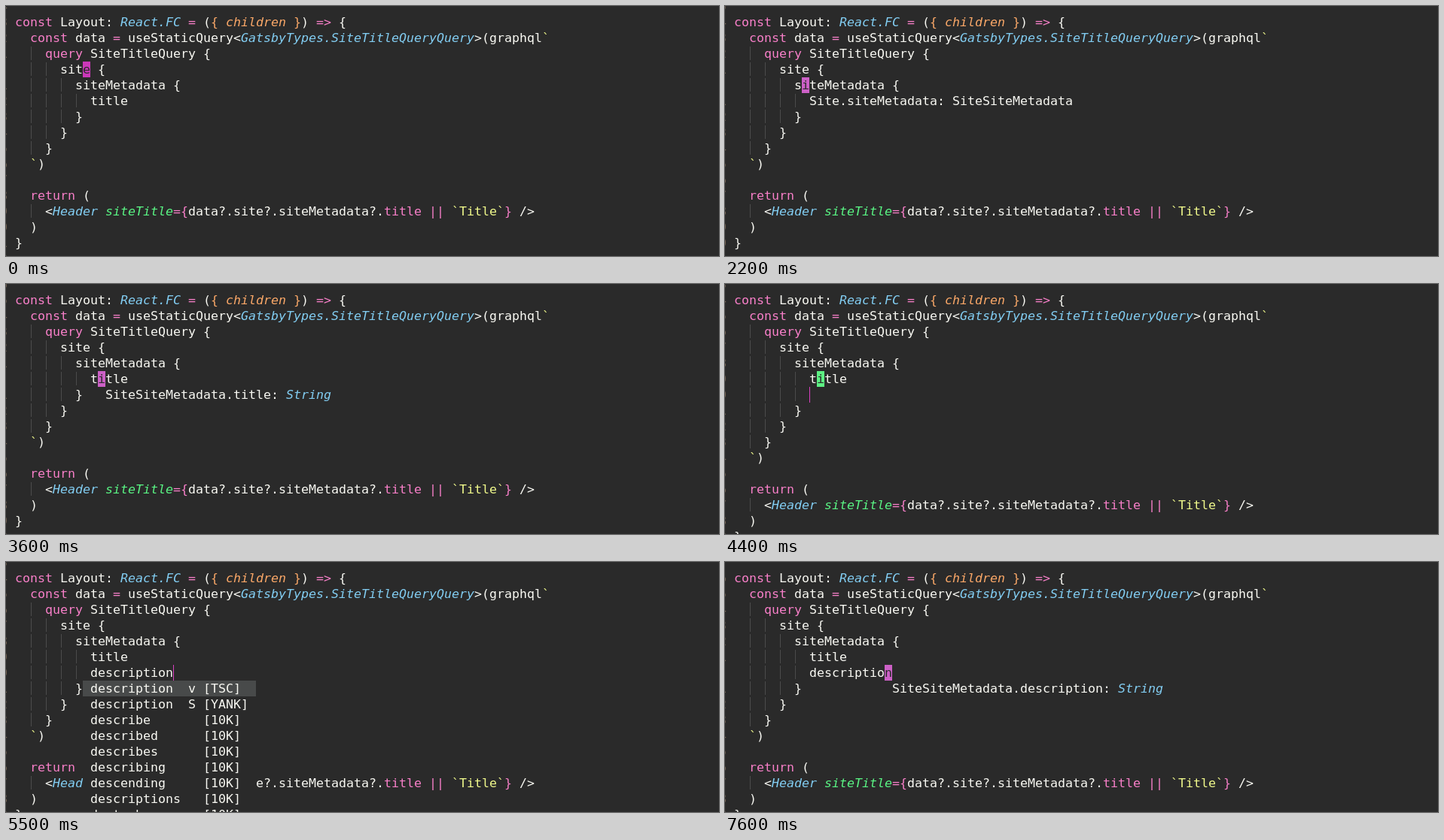
Animation of 947 by 333 pixels, one loop 8 s. Source, as an HTML page:

```html
<!DOCTYPE html>
<html lang="en">
<head>
<meta charset="utf-8">
<title>Editor</title>
<style>
  html, body { margin: 0; width: 100%; height: 100%; overflow: hidden; background: #2a2a2a; }
  #screen {
    position: relative; width: 947px; height: 333px; overflow: hidden;
    font: 16.61px/21px "DejaVu Sans Mono", monospace;
    font-variant-ligatures: none; color: #f8f8f2;
  }
  #screen div { position: absolute; height: 21px; white-space: pre; }
  .p { color: #f77fc8; }
  .c { color: #82cdf2; font-style: italic; }
  .o { color: #fba868; }
  .oi { color: #fba868; font-style: italic; }
  .g { color: #5af584; font-style: italic; }
  .y { color: #f1fa8c; }
  .num { color: #7d6a58; }
  .guide { background: #4b4b4b; width: 1px; }
  .panel { background: #2a2a2a; }
  .pick, .bar { background: #484a4a; }
  .cursor { background: #cb38b9; color: #2a2a2a; }
  .cursor.held { background: #cc60c6; }
  .ghost { background: #5df083; color: #2a2a2a; }
  .caret { background: #d83fc0; }
</style>
</head>
<body>
<div id="screen"></div>
<script>
const screen_ = document.getElementById('screen');
const CELL = 10, ROW = 21, LEFT = 12, TOP = 11, LOOP = 8000;

// Each line: indent, then class / text pairs
const head = [
  [0, 'p', 'const', '', ' Layout: ', 'c', 'React.FC', 'p', ' = ', '', '(', 'o', '{ ',
    'oi', 'children', 'o', ' }', '', ') ', 'p', '=>', '', ' {'],
  [2, 'p', 'const', '', ' data ', 'p', '=', '', ' useStaticQuery<',
    'c', 'GatsbyTypes.SiteTitleQueryQuery', '', '>(graphql', 'y', '`'],
  [4, 'p', 'query', '', ' SiteTitleQuery {'],
  [6, '', 'site {'],
  [8, '', 'siteMetadata {'],
  [10, '', 'title']
];
const tail = [
  [8, '', '}'],
  [6, '', '}'],
  [4, '', '}'],
  [2, 'y', '`', '', ')'],
  [0],
  [2, 'p', 'return', '', ' ('],
  [4, '', '<', 'c', 'Header', '', ' ', 'g', 'siteTitle', 'p', '={', '', 'data?.site?.siteMetadata?.',
    'p', 'title || ', 'y', '`Title`', 'p', '}', '', ' />'],
  [2, '', ')'],
  [0, '', '}']
];

const first = ['description  v [TSC]', 'description  S [YANK]'];
const wordRows = words => first.concat(words.split(' ').map(w => w.padEnd(15) + '[10K]'));
const desMenu = { rows: wordRows('desk design desire desert desktop designs despite'), bar: true };
const descMenu = { rows: wordRows('describe described describes describing descending descriptions deutsch') };

const siteTip = [4, 9, '', ' Query.site: Site'];
const metaTip = [5, 9, '', ' Site.siteMetadata: SiteSiteMetadata'];
const titleTip = [6, 11, '', ' SiteSiteMetadata.title: ', 'c', 'String'];
const descTip = [7, 20, '', ' SiteSiteMetadata.description: ', 'c', 'String'];

// at: cursor row, column, character; ghost: the same for the green mark
const onSite = [3, 9, 'e'], onMeta = [4, 9, 'i'], onTitle = [5, 11, 'i'], onDesc = [6, 20, 'n'];
const states = [
  { t: 0, at: onSite },
  { t: 500, at: onSite, tip: siteTip, held: true },
  { t: 1400, at: [4, 9, ' '], tip: siteTip, ghost: onSite },
  { t: 1500, at: onMeta, ghost: onSite },
  { t: 1600, at: onMeta },
  { t: 2200, at: onMeta, tip: metaTip, held: true },
  { t: 2900, at: [5, 9, ' '], tip: metaTip, ghost: onMeta },
  { t: 3000, at: [5, 10, 'S'], tip: metaTip, ghost: onMeta },
  { t: 3200, at: [5, 10, 't'], ghost: onMeta },
  { t: 3300, at: onTitle },
  { t: 3600, at: onTitle, tip: titleTip, held: true },
  { t: 4400, typed: '', insert: true, ghost: onTitle },
  { t: 4600, typed: 'd', insert: true },
  { t: 4700, typed: 'de', insert: true, menu: desMenu },
  { t: 4800, typed: 'des', insert: true, menu: desMenu },
  { t: 5100, typed: 'desc', insert: true, menu: descMenu },
  { t: 5500, typed: 'description', insert: true, menu: descMenu, picked: true },
  { t: 6500, typed: 'description', insert: true },
  { t: 7000, typed: 'description', at: onDesc },
  { t: 7600, typed: 'description', at: onDesc, tip: descTip, held: true }
];

function box(cls, x, y, w, h, text = '') {
  const el = document.createElement('div');
  el.className = cls;
  el.style.cssText = `left:${x}px;top:${y}px;` + (w ? `width:${w}px;` : '') + (h ? `height:${h}px` : '');
  el.textContent = text;
  screen_.append(el);
}
const xOf = col => LEFT + col * CELL;
const yOf = row => TOP + row * ROW;
const put = (row, col, text, cls = '') => box(cls, xOf(col), yOf(row), 0, 0, text);
const fill = (cls, row, col, cols, rows = 1) => box(cls, xOf(col), yOf(row), cols * CELL, rows * ROW);
const cell = (cls, [row, col, ch]) => box(cls, xOf(col), yOf(row), CELL, ROW, ch);

function putRuns(row, col, runs) {
  for (let i = 0; i < runs.length; i += 2) {
    put(row, col, runs[i + 1], runs[i]);
    col += runs[i + 1].length;
  }
}

function drawNumbers(s) {
  for (let row = -1; row < 16; row++) {
    const n = s.insert ? row + 4 : Math.abs(row - s.at[0]);
    if (s.insert || n) put(row, -2, n % 10, 'num');
  }
}

function drawMenu({ rows, bar }, picked) {
  const cols = bar ? 24 : 23;
  fill('panel', 7, 9, cols, rows.length);
  if (bar) fill('bar', 7, 9 + cols, 1, rows.length);
  if (picked) fill('pick', 7, 9, cols);
  rows.forEach((text, i) => put(7 + i, 10, text));
}

function draw(s) {
  screen_.textContent = '';
  drawNumbers(s);
  const extra = s.typed === undefined ? [] : [[10, '', s.typed]];
  [...head, ...extra, ...tail].forEach(([indent, ...runs], row) => {
    for (let col = 2; col < indent; col += 2) box('guide', xOf(col) + 1, yOf(row) + 1, 1, 18);
    putRuns(row, indent, runs);
  });
  if (s.tip) {
    const [row, col, ...runs] = s.tip;
    fill('panel', row, col, runs.filter((_, i) => i % 2).join('').length);
    putRuns(row, col, runs);
  }
  if (s.menu) drawMenu(s.menu, s.picked);
  if (s.ghost) cell('ghost', s.ghost);
  if (s.insert) box('caret', xOf(10 + s.typed.length), yOf(6), 1, ROW);
  else cell(s.held ? 'cursor held' : 'cursor', s.at);
}

let shown;
function tick() {
  const t = performance.now() % LOOP;
  const now = states.filter(s => s.t <= t).pop();
  if (now !== shown) draw(shown = now);
  requestAnimationFrame(tick);
}
tick();
</script>
</body>
</html>
```
